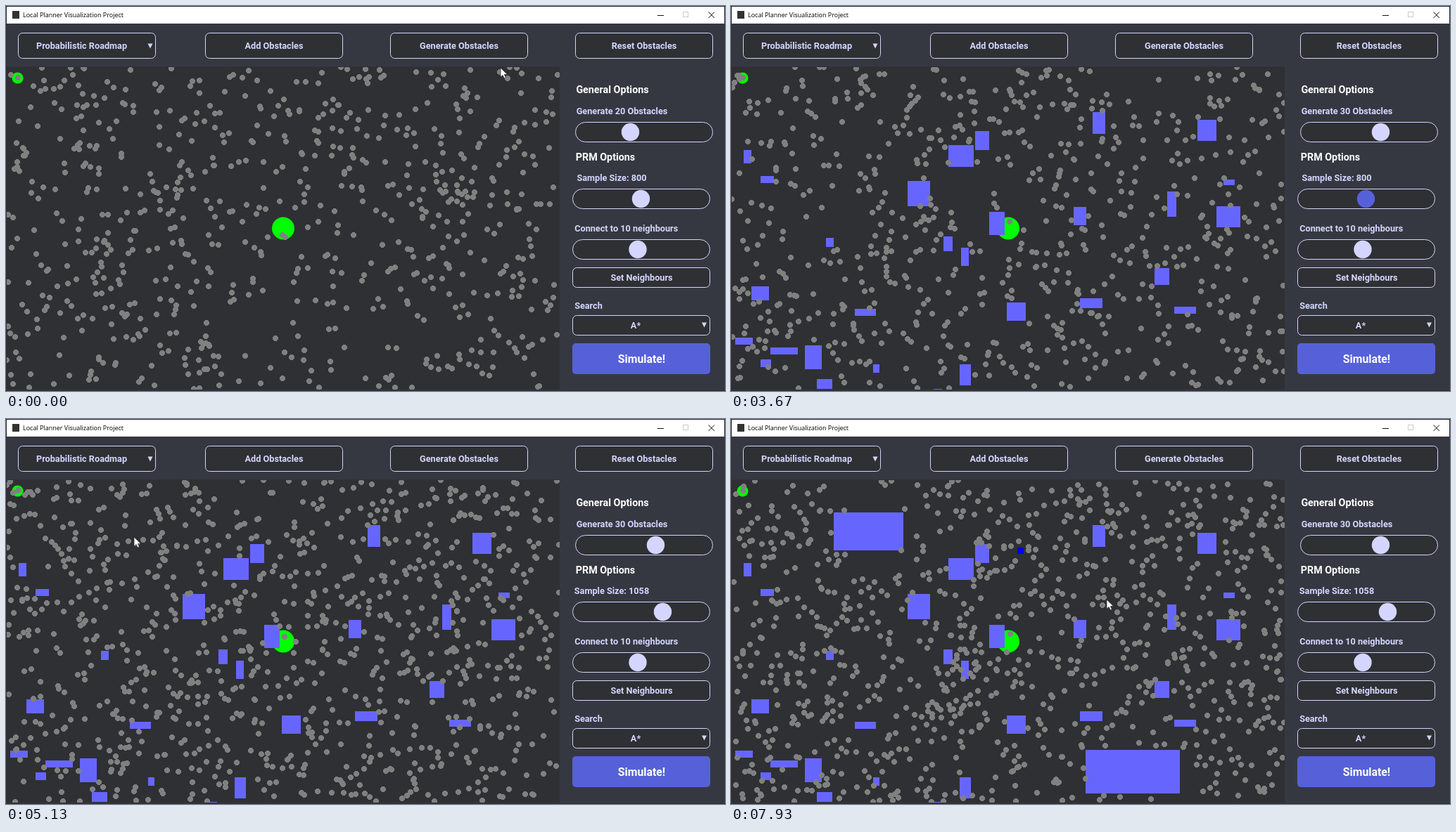
Write an HTML page with a canvas that moves like this. It is 1022 px wide and 548 px high and loops after 8000 ms.

```html
<!DOCTYPE html>
<html lang="en">
<head>
<meta charset="utf-8">
<title>Local Planner Visualization Project</title>
<style>
  html, body { margin: 0; width: 100%; height: 100%; overflow: hidden; background: #363841; }
  canvas, svg { position: absolute; left: 0; top: 0; display: block; }
  text { font: 700 12.7px Roboto, sans-serif; fill: #d4d6ff; text-anchor: middle; }
  text.heading { font-size: 14.3px; fill: #fff; }
  text.big { font-size: 15.8px; fill: #fff; }
  text.title { font: 400 9px "Open Sans", sans-serif; fill: #000; text-anchor: start; }
  .box { fill: #2f3033; stroke: #d4d6ff; }
  .hot { fill: #5661d9; }
  .thumb { fill: #d4d6ff; }
  .thumb.hot { fill: #5661d9; }
  .arrow { fill: #d4d6ff; }
</style>
</head>
<body>
<canvas id="field" width="1022" height="548"></canvas>
<svg id="ui" width="1022" height="548" viewBox="0 0 1022 548">
  <path d="M0 25H1022V87H787V548H0V546H787V87H0Z" fill="#363841"/>
  <path d="M0 86.5H787" stroke="#303138"/>
  <rect width="1022" height="25" fill="#fff"/>
  <path d="M0 .5H1022M.5 0V25M1021.5 0V25" stroke="#222"/>
  <path d="M.5 25V548" stroke="#382a33"/>
  <path d="M0 547.5H1022" stroke="#2a2b31"/>
  <rect x="9" y="7" width="10" height="11" fill="#333"/>
  <text class="title" x="24" y="16">Local Planner Visualization Project</text>
  <g fill="none" stroke="#111">
    <path d="M926 13.5H935M998.5 8.5L1007 17M1007 8.5L998.5 17"/>
    <rect x="962.5" y="8.5" width="7" height="7" stroke="#ccc"/>
  </g>
  <g id="controls"></g>
  <path id="cursor" d="M0 0V13.3L3.1 10.4 5.2 15 7.4 14 5.4 9.6H9.7Z" fill="#fff" stroke="#222" stroke-width=".7"/>
</svg>
<script>
const TICKS = 120, TICKS_PER_MS = 0.015;
const FIELD = { x: 1, y: 87, w: 786, h: 459 };
const RELEASES = [87, 113], PRESSES = [80, 106, 116];
const GENERATED = 39, SLIDE_START = 55, SLIDE_END = 62;

// x, y, width, height
const obstacles = [
  [18,205,11,19], [42,242,19,10], [309,198,36,31], [347,178,20,27], [514,151,18,31],
  [663,162,27,30], [251,249,32,36], [367,293,22,33], [487,286,18,26], [620,264,13,36],
  [700,247,16,8], [690,285,34,30], [135,330,11,13], [302,328,13,21], [327,344,11,26],
  [602,373,21,24], [29,399,25,20], [176,431,30,10], [392,422,27,26], [496,416,32,14],
  [630,428,31,10], [6,472,25,10], [56,486,39,10], [42,503,15,11], [105,483,24,34],
  [122,531,22,14], [202,510,9,12], [325,510,16,30], [288,545,12,1]
];
const drawn = [[146,133,99,54], [504,471,134,62]];

// Each run is one stretch of visible pointer: tick, x, y
const pointerRuns = [
  [[0,703,88], [1,710,79], [3,736,63], [12,736,63], [13,750,74], [16,900,140], [18,1000,216]],
  [[31,986,160], [34,850,105], [36,715,62], [39,700,60], [41,712,80], [43,743,119], [45,878,284]],
  [[64,795,236], [69,440,62], [71,400,58], [74,265,125], [76,184,169], [77,182,168],
   [80,146,133], [85,245,187], [87,246,195], [89,267,320], [91,290,420], [93,339,535]],
  [[104,480,535], [106,504,471], [111,638,533], [113,620,500], [116,407,183],
   [117,416,192], [119,534,257]]
];
// tick, value, thumb x
const amountKeys = [[24,20,887.5], [29,30,923.5]];
const sampleKeys = [[55,800,902.5], [59,999,928], [61,1058,933.5]];

function between(keys, t) {
  const next = keys.findIndex(k => k[0] > t);
  if (next === 0) return keys[0].slice(1);
  if (next < 0) return keys[keys.length - 1].slice(1);
  const a = keys[next - 1], b = keys[next], p = (t - a[0]) / (b[0] - a[0]);
  return a.slice(1).map((v, i) => v + (b[i + 1] - v) * p);
}

function pointerAt(t) {
  const run = pointerRuns.find(r => t >= r[0][0] && t <= r[r.length - 1][0]);
  return run && between(run, t).map(Math.round);
}

function random(seed) {
  return () => {
    seed = (seed + 0x6D2B79F5) | 0;
    let v = Math.imul(seed ^ seed >>> 15, 1 | seed);
    v = v + Math.imul(v ^ v >>> 7, 61 | v) ^ v;
    return ((v ^ v >>> 14) >>> 0) / 4294967296;
  };
}

const controls = document.getElementById('controls');
const cursor = document.getElementById('cursor');
const ctx = document.getElementById('field').getContext('2d');

function add(tag, attrs, content = '') {
  const el = document.createElementNS('http://www.w3.org/2000/svg', tag);
  for (const name in attrs) el.setAttribute(name, attrs[name]);
  el.textContent = content;
  return controls.appendChild(el);
}
const label = (x, y, content, cls = '') => add('text', { x, y, class: cls }, content);
const box = (x, y, height, rx) =>
  add('rect', { x: x + .5, y: y + .5, width: 195, height, rx, class: 'box' });
const arrow = (x, y) => add('path', { d: `M${x - 3.5} ${y - 3.5}h7l-3.5 7z`, class: 'arrow' });

function slider(x, y, thumbX) {
  box(x, y, 28, 14);
  return add('circle', { cx: thumbX, cy: y + 14.5, r: 12.7, class: 'thumb' });
}

const buttons = [[17, 107.5, 'Probabilistic Roadmap'], [283, 381, 'Add Obstacles'],
  [546, 644, 'Generate Obstacles'], [809, 907, 'Reset Obstacles']
].map(([x, center, name]) => {
  const el = box(x, 38, 36, 6);
  label(center, 61.4, name);
  return { x, el };
});
arrow(205, 57);

label(862, 124, 'General Options', 'heading');
const amountText = label(875.5, 153.8, '');
const amountThumb = slider(809, 165, 887.5);
label(852, 220, 'PRM Options', 'heading');
const sampleText = label(861, 249.2, '');
const sampleThumb = slider(805, 260, 902.5);
label(881.7, 320.8, 'Connect to 10 neighbours');
slider(805, 332, 898);
box(805, 372, 28, 6);
label(903.5, 391, 'Set Neighbours');
label(828, 430.8, 'Search');
box(805, 440, 28, 6);
label(895, 458.6, 'A*');
arrow(992.5, 454);
add('rect', { x: 805, y: 480, width: 196, height: 44, rx: 5, class: 'hot' });
label(903.5, 507.5, 'Simulate!', 'big');

function disc(x, y, r) {
  ctx.beginPath();
  ctx.arc(x, y, r, 0, 2 * Math.PI);
  ctx.fill();
}

function dot(x, y) {
  ctx.fillRect(x - 2, y - 4, 4, 8);
  ctx.fillRect(x - 3, y - 3, 6, 6);
  ctx.fillRect(x - 4, y - 2, 8, 4);
}

function drawField(t, samples) {
  const { x, y, w, h } = FIELD;
  const blocks = t < GENERATED ? [] : obstacles.concat(drawn.filter((_, i) => t >= RELEASES[i]));
  ctx.save();
  ctx.beginPath();
  ctx.rect(x, y, w, h);
  ctx.clip();
  ctx.fillStyle = '#2f3033';
  ctx.fillRect(x, y, w, h);
  ctx.fillStyle = '#0f0';
  disc(16.5, 102.5, 8);
  disc(394, 316.5, 16);
  ctx.fillStyle = '#6666ff';
  blocks.forEach(b => ctx.fillRect(...b));

  // A fresh sample set follows each new obstacle and each slider move
  const slides = Math.max(0, Math.min(t, SLIDE_END) - SLIDE_START + 1);
  const round = (t >= GENERATED) + slides + RELEASES.filter(r => t >= r).length;
  const rand = random(977 + round * 7919);
  const blocked = (px, py) => blocks.some(b =>
    px > b[0] && px < b[0] + b[2] && py > b[1] && py < b[1] + b[3]);
  ctx.fillStyle = '#808080';
  dot(17, 102);
  for (let left = samples * .88; left > 0;) {
    const px = x + Math.floor(rand() * w), py = y + Math.floor(rand() * h);
    if (blocked(px, py)) continue;
    dot(px, py);
    left--;
  }

  // The rubber band trails the pointer by two ticks
  const drag = PRESSES.findIndex((p, i) => t > p + 2 && t < (RELEASES[i] || TICKS));
  if (drag >= 0) {
    const [ax, ay] = pointerAt(PRESSES[drag]), [bx, by] = pointerAt(t - 2);
    ctx.fillStyle = '#00f';
    ctx.fillRect(ax, ay, bx - ax, by - ay);
  }
  ctx.restore();
}

function draw(t) {
  const [amount, amountX] = between(amountKeys, t);
  const [samples, sampleX] = between(sampleKeys, t);
  amountText.textContent = `Generate ${Math.round(amount)} Obstacles`;
  sampleText.textContent = `Sample Size: ${Math.round(samples)}`;
  amountThumb.setAttribute('cx', amountX);
  sampleThumb.setAttribute('cx', sampleX);
  amountThumb.classList.toggle('hot', t >= 19 && t < 29);
  sampleThumb.classList.toggle('hot', t >= SLIDE_START && t < SLIDE_END);

  const pos = pointerAt(t);
  cursor.style.display = pos ? '' : 'none';
  if (pos) cursor.setAttribute('transform', `translate(${pos})`);
  buttons.forEach(({ x, el }) => el.classList.toggle('hot',
    !!pos && pos[0] > x && pos[0] < x + 196 && pos[1] > 38 && pos[1] < 75));
  drawField(t, samples);
}

const start = performance.now();
let shown = -1;
function frame() {
  const elapsed = Math.max(0, performance.now() - start);
  const t = Math.floor(elapsed * TICKS_PER_MS + .1) % TICKS;
  if (t !== shown) draw(shown = t);
  requestAnimationFrame(frame);
}
frame();
</script>
</body>
</html>
```
